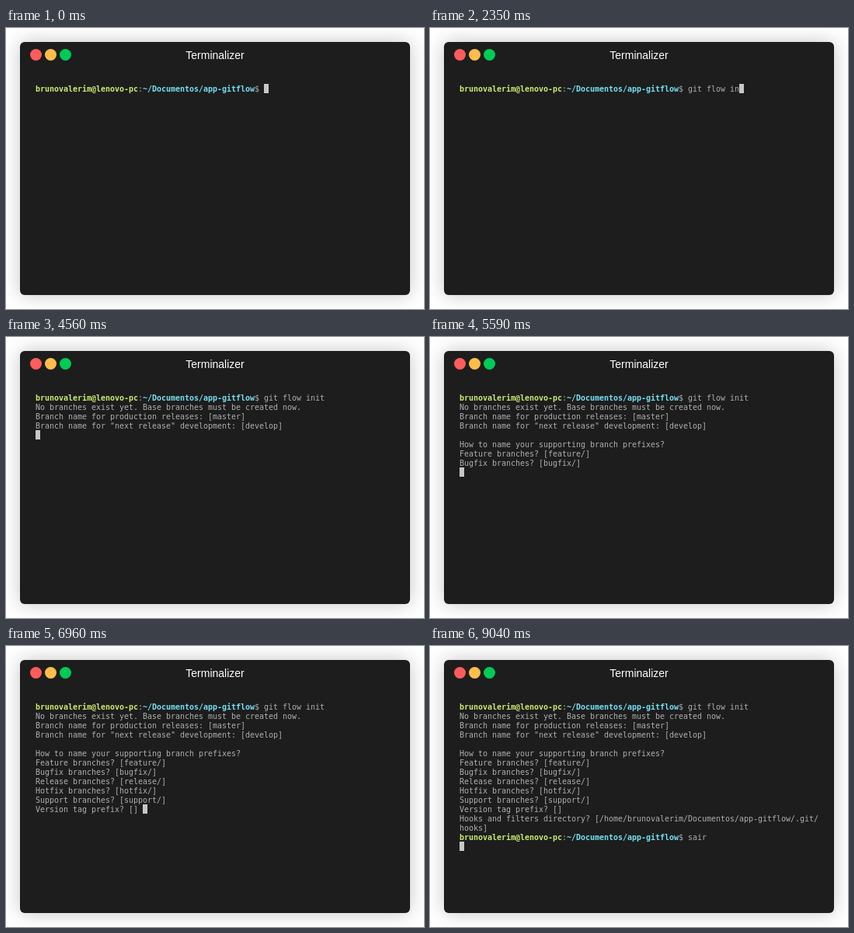
Animation of 538x362 px, one loop 9.52 s. Source, as an HTML page:

```html
<!DOCTYPE html>
<html lang="en">
<head>
<meta charset="utf-8">
<title>Terminal</title>
<style>
html, body { margin: 0; width: 100%; height: 100%; overflow: hidden; background: #fff; }
#window {
  position: absolute; left: 18px; top: 18px; width: 502px; height: 326px;
  border-radius: 6px; background: #1d1d1d; box-shadow: 0 0 24px rgba(0, 0, 0, .23);
}
.dot { position: absolute; top: 9px; width: 15px; height: 15px; border-radius: 50%; }
#title {
  position: absolute; left: 0; top: 9px; width: 100%; text-align: center;
  font: 14px/16px "Liberation Sans", Arial, sans-serif; color: #fff;
}
#screen { position: absolute; left: 20px; top: 54px; }
#text {
  position: relative; top: 1px; margin: 0; color: #afafaf; white-space: pre;
  font: 10px/12px "DejaVu Sans Mono", monospace;
  font-variant-ligatures: none;
}
.user { color: #c8ed71; }
.path { color: #75dff2; }
#cursor { position: absolute; width: 6px; height: 12px; background: #c7c7c7; }
</style>
</head>
<body>
<div id="window">
  <div class="dot" style="left:13px;background:#ff5c5c"></div>
  <div class="dot" style="left:32px;background:#ffbd4c"></div>
  <div class="dot" style="left:51px;background:#00ca56"></div>
  <div id="title">Terminalizer</div>
  <div id="screen"><pre id="text"></pre><div id="cursor"></div></div>
</div>
<script>
const LOOP = 9520, CELL = 6, ROW = 12;
const user = 'brunovalerim';
const prompt = `<b class="user">${user}@lenovo-pc</b>:<b class="path">~/Documentos/app-gitflow</b>$ `;

// Each step appends its markup to the screen at the given time.
const steps = [[0, prompt]];
const typed = [750, 850, 990, 1160, 1390, 1460, 1620, 1710, 1810, 2110, 2350, 2440, 2620];
typed.forEach((t, i) => steps.push([t, 'git flow init'[i]]));
steps.push(
  [2820, '\n'],
  [3080, 'No branches exist yet. Base branches must be created now.\n' +
         'Branch name for production releases: [master] '],
  [4050, '\n'],
  [4090, 'Branch name for "next release" development: [develop] '],
  [4560, '\n'],
  [4640, '\nHow to name your supporting branch prefixes?\nFeature branches? [feature/] '],
  [5090, '\n'],
  [5110, 'Bugfix branches? [bugfix/] '],
  [5590, '\n'],
  [5610, 'Release branches? [release/] '],
  [6090, '\n'],
  [6110, 'Hotfix branches? [hotfix/] '],
  [6490, '\n'],
  [6510, 'Support branches? [support/] '],
  [6940, '\n'],
  [6960, 'Version tag prefix? [] '],
  [7800, '\n'],
  [7830, `Hooks and filters directory? [/home/${user}/Documentos/app-gitflow/.git/\nhooks] `],
  [8390, '\n'],
  [8410, prompt],
  [9040, 'sair\n']
);

const text = document.getElementById('text');
const cursor = document.getElementById('cursor');

// Keep the glyph advance on the terminal's cell grid.
function fitGrid() {
  const probe = document.createElement('span');
  probe.textContent = 'm'.repeat(100);
  text.append(probe);
  const advance = probe.getBoundingClientRect().width / 100;
  text.style.letterSpacing = (CELL - advance).toFixed(4) + 'px';
  probe.remove();
}

let shown = -1;
function show(n) {
  if (n === shown) return;
  shown = n;
  text.innerHTML = steps.slice(0, n).map(s => s[1]).join('');
  const lines = text.textContent.split('\n');
  cursor.style.left = lines[lines.length - 1].length * CELL + 'px';
  cursor.style.top = (lines.length - 1) * ROW + 'px';
}

const start = performance.now();
function tick() {
  const t = (performance.now() - start) % LOOP;
  show(steps.filter(s => s[0] <= t).length);
  requestAnimationFrame(tick);
}
fitGrid();
tick();
</script>
</body>
</html>
```
